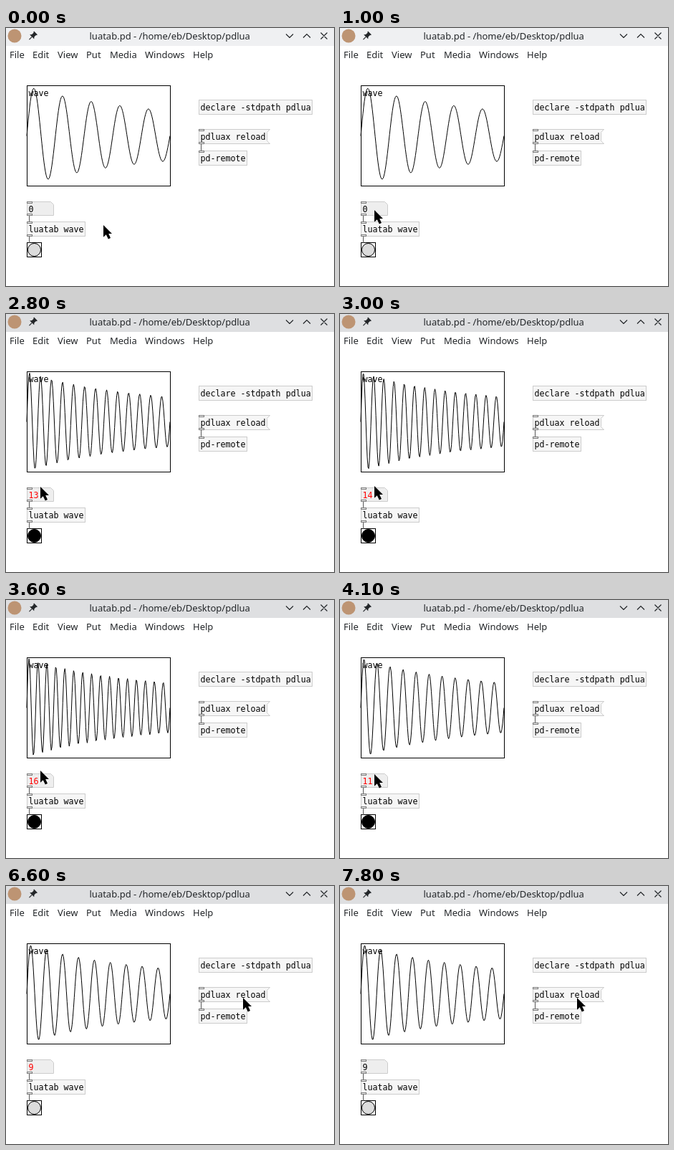
These frames come from a looping animation (458 by 360 pixels, 8000 ms). An HTML page:

```html
<!DOCTYPE html>
<html lang="en">
<head>
<meta charset="utf-8">
<title>Patch window</title>
<style>
html, body { margin: 0; width: 100%; height: 100%; overflow: hidden; background: #fff; }
svg { display: block; width: 458px; height: 360px; }
.ui { font: 13px "Noto Sans", "Open Sans", sans-serif; fill: #232629; }
.patch { font: 11.65px "DejaVu Sans Mono", monospace; fill: #000; }
.box { fill: #f6f6f6; stroke: #ccc; }
.line { fill: none; stroke: #000; }
.icon { fill: none; stroke: #232629; stroke-width: 1.2; }
.port { fill: #fff; stroke: #777; }
.cord { stroke: #555; }
text { white-space: pre; }
</style>
</head>
<body>
<svg viewBox="0 0 458 360">
  <rect width="458" height="360" fill="#fff"/>
  <rect id="bar" width="458" height="25"/>
  <circle cx="12" cy="11" r="9.5" fill="#bd9473"/>
  <g transform="translate(37.5 11) rotate(45) scale(.95)" fill="#232629">
    <path d="M-3.5 -6H3.5V-4.5H2.5V-.5L4.5 2H-4.5L-2.5 -.5V-4.5H-3.5Z"/>
    <rect x="-.6" y="2" width="1.2" height="5.5"/>
  </g>
  <path class="icon" d="M391 8.5l5 5 5-5M415 13.5l5-5 5 5M439.500 6.500l9 9M448.500 6.500l-9 9"/>
  <g id="ui" class="ui"><text x="116.500" y="16">luatab.pd - /home/eb/Desktop/pdlua</text></g>

  <rect class="line" x="29.5" y="80.5" width="200" height="140"/>
  <path id="wave" class="line"/>

  <rect class="box" x="269.5" y="100.5" width="158" height="20"/>
  <path id="msg" class="box" d="M269.5 141.5H368.5L364.5 145.5V157.5L368.5 161.5H269.5Z"/>
  <rect class="box" x="269.5" y="171.5" width="67" height="20"/>
  <path class="box" style="fill:#eee" d="M29.5 242.5H62.5L66.5 246.5V261.5H29.5Z"/>
  <rect class="box" x="29.5" y="270.5" width="81" height="20"/>
  <rect x="29.5" y="299.5" width="20" height="20" fill="#fcfcfc" stroke="#000"/>
  <circle id="bang" cx="39.5" cy="309.5" r="9" stroke="#000"/>
  <g id="ports"></g>
  <g id="labels" class="patch"><text id="num" x="31.5" y="257"></text></g>

  <path id="cursor" d="M0 0V16.700L3.800 13.200L6.800 19.500L10 18L7.200 12H12Z"
    fill="#000" stroke="#fff" stroke-width=".8" paint-order="stroke"/>
</svg>
<script>
const $ = id => document.getElementById(id);
const LOOP = 8000, STEP = 100;

function add(parent, tag, attrs, text = "") {
  const el = document.createElementNS("http://www.w3.org/2000/svg", tag);
  for (const key in attrs) el.setAttribute(key, attrs[key]);
  el.textContent = text;
  $(parent).append(el);
}

[["File", 5], ["Edit", 37], ["View", 72], ["Put", 112], ["Media", 145], ["Windows", 194], ["Help", 261]]
  .forEach(([name, x]) => add("ui", "text", { x, y: 42 }, name));

[["wave", 31.5, 95], ["declare -stdpath pdlua", 271.5, 115], ["pdluax reload", 271.5, 156],
 ["pd-remote", 271.5, 186], ["luatab wave", 31.5, 285]]
  .forEach(([name, x, y]) => add("labels", "text", { x, y }, name));

[[272.5, 162, 172], [32.5, 262, 271], [32.5, 291, 300]]
  .forEach(([x, y1, y2]) => add("ports", "line", { class: "cord", x1: x, x2: x, y1, y2 }));

[[269.5, 141.5], [269.5, 159.5], [269.5, 171.5], [29.5, 242.5], [29.5, 259.5], [29.5, 270.5], [29.5, 288.5]]
  .forEach(([x, y]) => add("ports", "rect", { class: "port", x, y, width: 7, height: 2 }));

// the number is dragged in short pulls; power > 1 slows the pull towards its end
const pulls = [
  { start: 1500, end: 1700, to: 2 },
  { start: 1800, end: 2100, to: 5 },
  { start: 2600, end: 3000, to: 14, power: 3 },
  { start: 3400, end: 3600, to: 16 },
  { start: 3600, end: 3800, to: 14 },
  { start: 3900, end: 4200, to: 9 },
];

const glides = [
  { start: 400, end: 1000, from: [136, 275], to: [48, 254] },
  { start: 5100, end: 5700, from: [48, 245], to: [305, 275] },
  { start: 5800, end: 6600, from: [305, 275], to: [331, 156] },
];

const mix = (a, b, k) => a + (b - a) * k;
const progress = (t, a, b) => Math.min(1, Math.max(0, (t - a) / (b - a)));
const easeInOut = k => k < .5 ? 4 * k ** 3 : 1 - 4 * (1 - k) ** 3;

function dragged(t) {
  return Math.round(pulls.reduce((value, { start, end, to, power = 1 }) =>
    mix(value, to, 1 - (1 - progress(t, start, end)) ** power), 0));
}

function pointer(t) {
  if (t >= 1500 && t <= 5100) return [48, 254 - dragged(t)];
  const { start, end, from, to } = glides.findLast(g => t >= g.start) ?? glides[0];
  const k = easeInOut(progress(t, start, end));
  return from.map((a, i) => mix(a, to[i], k));
}

// damped sine stored in a table of 200 values
function wavePath(freq) {
  const last = 199, points = [];
  for (let i = 0; i <= last; i++) {
    const y = Math.sin(2 * Math.PI * freq * i / last) / (1 + i / last);
    points.push((29 + 200 * i / last).toFixed(2) + " " + (150.5 - 69.5 * y).toFixed(2));
  }
  return "M" + points.join("L");
}

function draw(time) {
  const t = Math.floor(time % LOOP / STEP) * STEP;
  const value = dragged(t);
  const lit = pulls.some(p => t > p.start && t < p.end + 200);

  const shade = mix(239, 222, progress(t, 1400, 1700));
  $("bar").setAttribute("fill", `rgb(${[0, 1, 3].map(d => Math.round(shade + d))})`);

  $("wave").setAttribute("d", wavePath(value || 5));
  $("num").textContent = value;
  $("num").style.fill = t >= 1500 && t < 7700 ? "#f00" : "#000";
  $("bang").setAttribute("fill", lit ? "#000" : "#dcdcdc");
  $("msg").style.strokeWidth = t === 7700 ? 5 : 1;
  $("cursor").setAttribute("transform", `translate(${pointer(t)})`);
}

let start;
function tick(now) {
  start ??= now;
  draw(now - start);
  requestAnimationFrame(tick);
}
draw(0);
requestAnimationFrame(tick);
</script>
</body>
</html>
```
